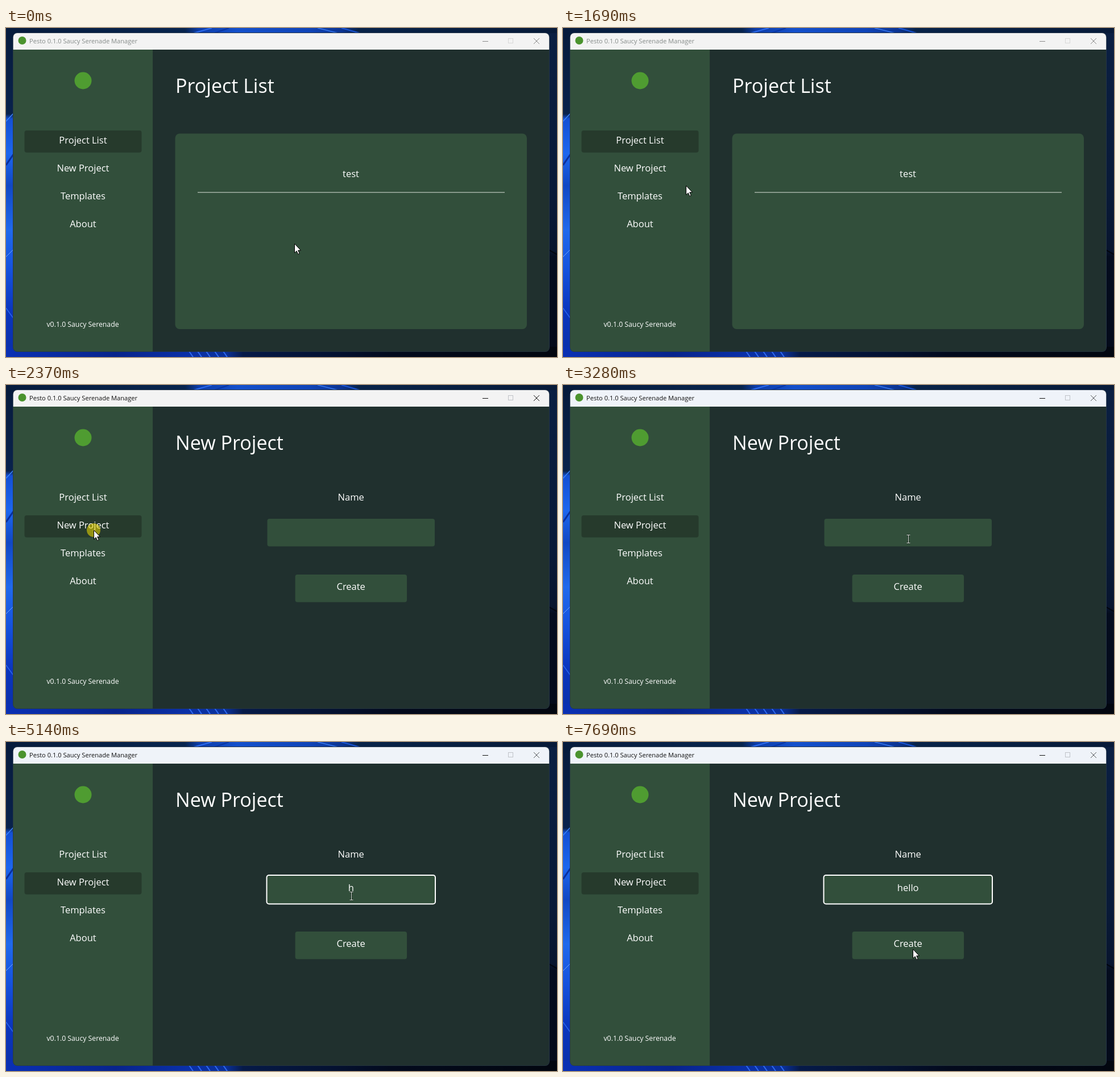
These frames come from a looping animation (969x578 px, 8 s). An HTML page with a canvas:

```html
<!DOCTYPE html>
<html lang="en">
<head>
<meta charset="utf-8">
<title>Project manager</title>
<style>
  html, body { margin: 0; width: 100%; height: 100%; overflow: hidden; background: #081a3a; }
  canvas { display: block; width: 969px; height: 578px; }
</style>
</head>
<body>
<canvas id="stage" width="969" height="578"></canvas>
<script>
const ctx = document.getElementById('stage').getContext('2d');
const LOOP = 8000, STEP = 70;
const GREEN = '#324f3b', DARK = '#20302e', SELECTED = '#263a2c';
const NAV = ['Project List', 'New Project', 'Templates', 'About'];
const PAGE_AT = 2370, FOCUS_AT = 3810;
const KEY_TIMES = [5140, 5340, 5940, 6140, 6340];
const CLICKS = [
  { start: 2300, end: 2510, dx: 0, dy: 0 },
  { start: 3810, end: 4010, dx: -2, dy: -1 }
];

const smooth = u => u * u * (3 - 2 * u);
const MOVES = [
  { start: 990, steps: 15, from: [507, 379], to: [154, 255], ease: smooth, bend: 0 },
  { start: 2440, steps: 13, from: [154, 255], to: [607, 270], ease: u => 1 - (1 - smooth(u)) ** 1.5, bend: 50 },
  { start: 7340, steps: 6, from: [607, 270], to: [615, 364], ease: smooth, bend: 0 }
];

function pointerAt(t) {
  const move = MOVES.filter(m => t >= m.start).pop();
  if (!move) return MOVES[0].from;
  const step = Math.min(move.steps, Math.floor((t - move.start) / STEP) + 1);
  const p = move.ease(step / move.steps);
  const [x, y] = move.from.map((v, i) => v + (move.to[i] - v) * p);
  return [Math.round(x), Math.round(y + move.bend * p * p * (1 - p))];
}

function box(x, y, w, h, r, fill) {
  ctx.beginPath();
  ctx.roundRect(x, y, w, h, r);
  ctx.fillStyle = fill;
  ctx.fill();
}

function disc(x, y, r, fill) {
  ctx.beginPath();
  ctx.arc(x, y, r, 0, Math.PI * 2);
  ctx.fillStyle = fill;
  ctx.fill();
}

function label(text, x, y, size, align = 'center', color = '#fff') {
  ctx.font = `${size}px "Open Sans", "Noto Sans", sans-serif`;
  ctx.textAlign = align;
  ctx.fillStyle = color;
  ctx.fillText(text, x, y);
}

function line(points, color, width) {
  ctx.beginPath();
  points.forEach(([x, y], i) => i ? ctx.lineTo(x, y) : ctx.moveTo(x, y));
  ctx.strokeStyle = color;
  ctx.lineWidth = width;
  ctx.stroke();
}

function strip(x, y, w, h, stops) {
  const g = w > h ? ctx.createLinearGradient(x, 0, x + w, 0) : ctx.createLinearGradient(0, y, 0, y + h);
  stops.forEach(([at, color]) => g.addColorStop(at, color));
  ctx.fillStyle = g;
  ctx.fillRect(x, y, w, h);
}

function drawDesktop() {
  strip(0, 0, 969, 20, [[0, '#061b3c'], [.325, '#07244e'], [.35, '#0c3ca8'], [.42, '#1450cc'],
    [.55, '#0f44b8'], [.61, '#0b3492'], [.64, '#082349'], [1, '#071a38']]);
  strip(0, 20, 20, 558, [[0, '#071c3e'], [.235, '#09224c'], [.25, '#1450d4'], [.36, '#1d66ee'],
    [.46, '#1148c4'], [.6, '#2069ec'], [.72, '#1653de'], [.86, '#0b35bd'], [1, '#0a2fa8']]);
  strip(945, 9, 24, 569, [[0, '#0a1f42'], [.5, '#091a38'], [.67, '#08152e'], [.69, '#040c1e'], [1, '#040a1a']]);
  strip(0, 560, 969, 18, [[0, '#0a30b4'], [.2, '#08248c'], [.33, '#0a30a8'], [.4, '#0a3098'],
    [.43, '#061a48'], [.6, '#041130'], [.7, '#030a1d'], [1, '#02060f']]);
  // petal edges
  line([[0, 164], [13, 150]], '#3d86fa', 1.5);
  line([[0, 241], [13, 222]], '#0a2f9d', 3);
  line([[0, 402], [13, 389]], '#72a6fb', 1);
  line([[0, 492], [13, 510]], '#2b66ec', 1.5);
  line([[330, 9], [362, 0]], '#2d6cf0', 2);
  line([[366, 9], [392, 0]], '#0835a4', 2);
  line([[548, 0], [584, 9]], '#3878ef', 1.5);
  line([[590, 0], [622, 9]], '#1a56d8', 2);
  for (let x = 322; x < 395; x += 15) line([[x, 568], [x + 7, 578]], '#2f69ef', 2);
  line([[955, 390], [969, 398]], '#02050d', 2);
}

function drawTitleBar(t) {
  const active = t >= PAGE_AT, settled = t >= PAGE_AT + STEP;
  ctx.fillStyle = settled ? '#eff3f9' : '#f3f3f3';
  ctx.fillRect(12, 9, 945, 29);
  disc(28.5, 22, 7, '#4b932e');
  label('Pesto 0.1.0 Saucy Serenade Manager', 41, 27, 11.1, 'left', active ? '#111' : '#858b89');
  line([[838, 23.5], [848, 23.5]], active ? '#111' : '#8a8a8a', 1);
  ctx.strokeStyle = active ? '#c0c3c8' : '#d8d8d8';
  ctx.strokeRect(883.5, 18.5, 8, 8);
  const close = settled ? '#55585c' : active ? '#111' : '#888';
  line([[928, 18], [938, 28]], close, 1);
  line([[938, 18], [928, 28]], close, 1);
}

function drawSidebar(selected) {
  ctx.fillStyle = GREEN;
  ctx.fillRect(12, 38, 246, 531);
  disc(135.5, 92.5, 15, '#4f9c31');
  box(32.5, 180 + selected * 49, 206, 38.7, 4, SELECTED);
  NAV.forEach((name, i) => label(name, 135.4, 203 + i * 49, 16.5));
  label('v0.1.0 Saucy Serenade', 135, 525, 12.25);
}

function drawList() {
  box(297.5, 185.5, 618.5, 343.5, 8, GREEN);
  label('test', 606.5, 262, 16.5);
  line([[337, 288.7], [877, 288.7]], '#a2b0a4', 1.6);
}

function drawForm(t) {
  label('Name', 606.7, 203, 16.5);
  if (t >= FOCUS_AT) box(457.5, 233, 298.5, 52.5, 5, '#fff');
  box(459.5, 235, 294.5, 48.5, t >= FOCUS_AT ? 3 : 4, GREEN);
  const typed = KEY_TIMES.filter(k => t >= k).length;
  label('hello'.slice(0, typed), 606.7, 262, 16.5);
  box(508.6, 333, 196.4, 48.6, 4, GREEN);
  label('Create', 606.7, 360, 16.5);
}

function drawArrow(x, y) {
  ctx.save();
  ctx.translate(x + .5, y);
  ctx.beginPath();
  ctx.moveTo(0, 0);
  ctx.lineTo(0, 16);
  ctx.lineTo(3.7, 12.7);
  ctx.lineTo(6.2, 18.4);
  ctx.lineTo(8.7, 17.3);
  ctx.lineTo(6.2, 11.7);
  ctx.lineTo(11, 11.7);
  ctx.closePath();
  ctx.fillStyle = '#fff';
  ctx.fill();
  ctx.strokeStyle = '#000';
  ctx.lineWidth = 1;
  ctx.stroke();
  ctx.restore();
}

function drawBeam(x, y) {
  for (const [color, width] of [['#1d2c22', 2.4], ['#d5dcd6', 1]]) {
    line([[x + .5, y - 7], [x + .5, y + 8]], color, width);
    for (const edge of [y - 6.5, y + 7.5]) line([[x - 2.5, edge], [x + 3.5, edge]], color, width);
  }
}

function drawPointer(t) {
  const [x, y] = pointerAt(t);
  const click = CLICKS.find(c => t >= c.start && t < c.end);
  if (click) disc(x + click.dx, y + click.dy, 12, 'rgba(240,220,0,.55)');
  const overInput = t >= PAGE_AT && x > 459 && x < 754 && y > 235 && y < 284;
  (overInput ? drawBeam : drawArrow)(x, y);
}

function draw(t) {
  const formOpen = t >= PAGE_AT;
  drawDesktop();
  box(12, 8, 944, 561, 8, '#28384c');
  ctx.save();
  ctx.beginPath();
  ctx.roundRect(12.7, 9, 942.5, 559.5, 7);
  ctx.clip();
  ctx.fillStyle = DARK;
  ctx.fillRect(12, 9, 945, 561);
  drawTitleBar(t);
  drawSidebar(formOpen ? 1 : 0);
  label(formOpen ? 'New Project' : 'Project List', 298, 114, 34.1, 'left');
  if (formOpen) drawForm(t);
  else drawList();
  ctx.restore();
  drawPointer(t);
}

function tick() {
  draw(performance.now() % LOOP);
  requestAnimationFrame(tick);
}
tick();
</script>
</body>
</html>
```
